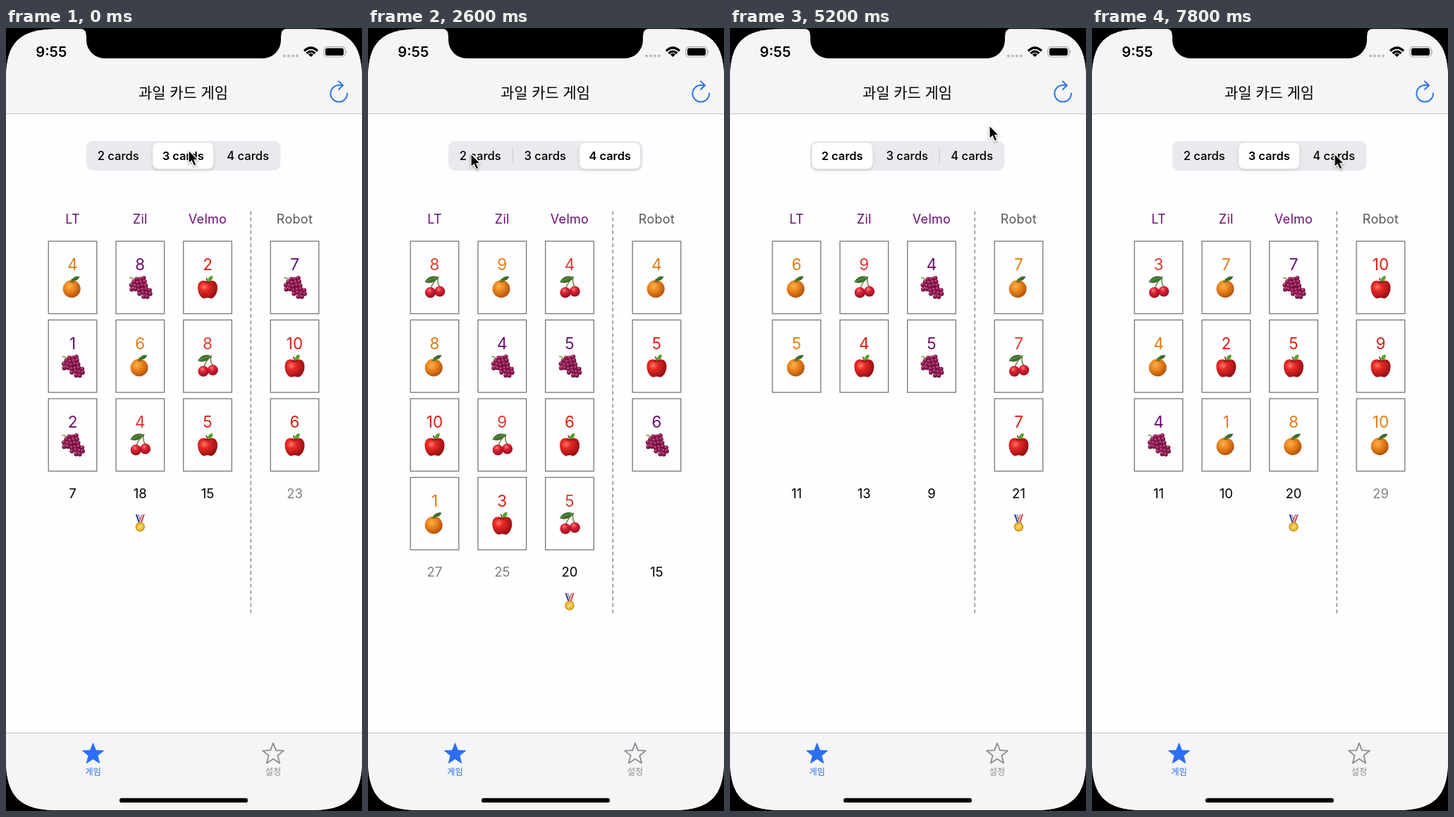
Write an HTML page that moves like this. It is 505 px wide and 1109 px high and loops after 8 s.

```html
<!DOCTYPE html>
<html lang="ko">
<head>
<meta charset="utf-8">
<title>과일 카드 게임</title>
<style>
  html, body { margin: 0; height: 100%; overflow: hidden; background: #000; }
  svg { display: block; width: 100vw; height: 100vh; }
  text { font-family: Inter, "Noto Sans CJK KR", "Noto Sans CJK", sans-serif; text-anchor: middle; }
  .ko { font-family: "Noto Sans CJK KR", "Noto Sans CJK", sans-serif; font-weight: 500; }
  .name { font-size: 18px; letter-spacing: .3px; }
  .num { font-size: 22.5px; }
  .total { font-size: 18.5px; }
  .seg { font-size: 16.6px; font-weight: 500; }
  .seg.on { font-size: 16.4px; font-weight: 600; }
  #thumb { filter: drop-shadow(0 2px 2.5px #0002); }
  #cursor { filter: drop-shadow(0 1px 1.5px #0006); }
</style>
</head>
<body>
<svg viewBox="0 0 505 1109" preserveAspectRatio="none">
  <defs>
    <radialGradient id="appleFill" cx=".33" cy=".35" r=".75">
      <stop offset="0" stop-color="#ff7768"/><stop offset=".3" stop-color="#e62a26"/><stop offset="1" stop-color="#8e0a10"/>
    </radialGradient>
    <radialGradient id="orangeFill" cx=".38" cy=".35" r=".7">
      <stop offset="0" stop-color="#ffb04a"/><stop offset=".45" stop-color="#e8821c"/><stop offset="1" stop-color="#ad4d08"/>
    </radialGradient>
    <radialGradient id="cherryFill" cx=".4" cy=".3" r=".75">
      <stop offset="0" stop-color="#ff7c7a"/><stop offset=".35" stop-color="#da2433"/><stop offset="1" stop-color="#920a1d"/>
    </radialGradient>
    <radialGradient id="grapeFill" cx=".4" cy=".3" r=".75">
      <stop offset="0" stop-color="#cf5f90"/><stop offset=".4" stop-color="#951d55"/><stop offset="1" stop-color="#500a31"/>
    </radialGradient>
    <g id="a">
      <path d="M0-7C4-11 14-10 14 1C14 9 9 16 5 16C3 16 2 15 0 15S-3 16-5 16C-9 16-14 9-14 1C-14-10-4-11 0-7Z" fill="url(#appleFill)"/>
      <path d="M-5-7Q0-4 5-7Q0-9-5-7" fill="#8d131a"/>
      <path d="M0-6Q0-10-2-13" fill="none" stroke="#6b4423" stroke-width="1.7"/>
      <path d="M0-8C0-13 3-16 7-16C8-11 5-8 0-8Z" fill="#58a22c"/>
    </g>
    <g id="o">
      <circle cx="-1.3" cy="2.5" r="12.5" fill="url(#orangeFill)"/>
      <path d="M-1-8L-1-12M-4-8L2-7" stroke="#50702b" stroke-width="1.7"/>
      <path d="M-1-9C0-14 4-16 10-15C8-10 4-8-1-9Z" fill="#3a6f2c"/>
    </g>
    <g id="c">
      <path d="M-6 3Q-2-8 5-14Q3-5 8 0" fill="none" stroke="#61833a" stroke-width="1.5"/>
      <path d="M-14-7C-10-16-1-17 6-14C1-7-6-4-14-7Z" fill="#426f30"/>
      <path d="M-12-8Q-4-13 5-14" fill="none" stroke="#84a862" stroke-width=".7"/>
      <circle cx="7.3" cy="6" r="7.5" fill="url(#cherryFill)"/>
      <circle cx="-6" cy="7.7" r="7.6" fill="url(#cherryFill)"/>
    </g>
    <g id="g"></g>
    <g id="medal">
      <path d="M-6.5-12h4.500L2.500 1H-2Z" fill="#2b3c86"/>
      <path d="M-4.200-12h1.500L1 0H-.5Z" fill="#f1edf2"/>
      <path d="M6.500-12H2L-2.500 1H2Z" fill="#c53241"/>
      <path d="M4.700-12H3.200L-1 0H.5Z" fill="#f1edf2"/>
      <circle cy="5.500" r="6.700" fill="#cf981c"/>
      <circle cy="5.500" r="5" fill="#ecc240"/>
      <path d="M-2.500 7.500L2.500 3.500" stroke="#fff0a6" stroke-width="1.500"/>
    </g>
    <path id="star" stroke-linejoin="round"/>
    <clipPath id="screen">
      <path d="M0 72C0 20 20 1.500 72 1.500H433C485 1.500 505 20 505 72V1037C505 1088 485 1108 433 1108H72C20 1108 0 1088 0 1037Z"/>
    </clipPath>
  </defs>

  <g clip-path="url(#screen)">
    <rect width="505" height="1109" fill="#fefdff"/>
    <path d="M0 0H505V121H0ZM0 998H505V1109H0Z" fill="#f5f4f6"/>
    <path d="M0 121.500H505M0 998.500H505" stroke="#c3c2c5"/>
  </g>
  <path d="M104 0Q114 1 114 12V17A26 26 0 0 0 140 43H364A26 26 0 0 0 390 17V12Q390 1 400 0Z"/>

  <text x="64.300" y="41" font-size="20.200" font-weight="600">9:55</text>
  <g fill="#bdbdc0" id="dots"></g>
  <g fill="none" stroke="#000" stroke-width="3.200">
    <path d="M423 32.500Q432.500 23.500 442 32.500M426.500 36Q432.500 30.500 438.500 36"/>
    <path d="M432.500 41L428.800 37.500Q432.500 34.500 436.200 37.500Z" fill="#000" stroke="none"/>
  </g>
  <rect x="451" y="26.500" width="30" height="14.500" rx="4.500" fill="none" stroke="#a3a3a5" stroke-width="1.200"/>
  <rect x="453" y="28.500" width="26" height="10.500" rx="2.800"/>
  <path d="M482.300 31.500Q484.500 33.700 482.300 36Z" fill="#a3a3a5"/>

  <text class="ko" x="251.500" y="99" font-size="20.900">과일 카드 게임</text>
  <path id="refresh" d="M484 92.500A11.800 11.800 0 1 1 472.300 81H478M472 75.500L478 81.200L472 87" fill="none"
        stroke="#2e76e6" stroke-width="2" stroke-linecap="round" stroke-linejoin="round"/>

  <rect x="114" y="160" width="275.500" height="42" rx="9.500" fill="#eae9ed"/>
  <path id="divider1" d="M205.500 170V192" stroke="#cfced3" stroke-width="1.300"/>
  <path id="divider2" d="M297 170V192" stroke="#cfced3" stroke-width="1.300"/>
  <rect id="thumb" y="162.500" width="86" height="37" rx="8" fill="#fff"/>
  <g id="segments"></g>

  <path d="M347.300 259.500V830" stroke="#85858a" stroke-width="1.400" stroke-dasharray="5.200 3.900"/>
  <g id="table"></g>

  <use href="#star" x="123.500" y="1028.500" fill="#2a6ff3" stroke="#2a6ff3"/>
  <use href="#star" x="379" y="1028.500" fill="none" stroke="#8c8c90" stroke-width="1.800"/>
  <text class="ko" x="123.500" y="1057.500" font-size="12.300" fill="#2a6ff3">게임</text>
  <text class="ko" x="379" y="1057.500" font-size="12.300" fill="#8c8c90">설정</text>
  <rect x="161" y="1090.700" width="182" height="6.400" rx="3.200"/>

  <path id="cursor" d="M0 0V19L4.300 15L7.500 22.300L11 20.800L8 13.800H13.500Z" stroke="#fff" stroke-width="1.300"/>
</svg>
<script>
const LOOP = 8000, STEP = 200, ROW = 111.5;
const columns = [94.5, 190.3, 286, 409.5];
const players = ['LT', 'Zil', 'Velmo', 'Robot'];
const inks = { a: '#dc1f12', o: '#e17d12', c: '#dc3b33', g: '#690f70' };

// Each deal: start time, cards per player, hands of value + fruit.
const deals = [
  [0, 3, '4o1g2g 8g6o4c 2a8c5a 7g10a6a'],
  [1150, 4, '8c8o10a1o 9o4g9c3a 4c5g6a5c 4o5a6g'],
  [2750, 2, '6c2g 5a4o 9o8o 9g4c8g'],
  [4350, 2, '6o5o 9c4a 4g5g 7o7c7a'],
  [5650, 3, '8g1c2a 2o1o4g 7a9g3c 6c5o4a'],
  [6750, 3, '3c4o4g 7o2a1o 7g5a8o 10a9a10o']
];

// Pointer tip: time, x, y.
const pointer = [
  [0, 259, 173], [400, 259, 173], [1000, 355, 174], [1600, 355, 174],
  [2600, 146, 178], [2800, 146, 178], [3400, 433, 107], [3600, 464, 90],
  [3800, 471, 84], [5000, 471, 84], [5200, 368, 138], [5600, 262, 187],
  [6000, 262, 188], [6600, 471, 84], [7400, 472, 87], [7800, 344, 178]
];

const $ = id => document.getElementById(id);
const clamp = v => Math.max(0, Math.min(1, v));
const easeOut = v => 1 - (1 - clamp(v)) ** 3;
const mix = (a, b, p) => a + (b - a) * p;
const sum = cards => cards.reduce((total, [value]) => total + value, 0);
const label = (cls, x, y, fill, value) =>
  `<text class="${cls}" x="${x}" y="${y}" fill="${fill}">${value}</text>`;

function drawStatic() {
  // Berry rows: y, first x, count; a slight wobble keeps the bunch ragged.
  const berryRows = [[-12, -5, 3], [-7, -9, 4], [-2, -12.5, 5], [3.5, -12, 6], [8.5, -1, 4], [13, 5, 2]];
  const berry = (x, y) => `<circle cx="${x}" cy="${y}" r="3.1" fill="url(#grapeFill)"/>`;
  $('g').innerHTML =
    '<path d="M-15-13Q-9-14-8-7Q-14-8-13-1" fill="none" stroke="#80ae45" stroke-width="1.8"/>' +
    '<path d="M-5-11L5-11L13 5L11 12L-10 3Z" fill="#5f0f3b"/>' +
    berryRows.map(([y, x, count]) => Array.from({ length: count }, (_, i) =>
      berry(x + i * 5.1, y + Math.sin(i * 2 + y))).join('')).join('');

  const points = Array.from({ length: 10 }, (_, i) => {
    const r = i % 2 ? 6.7 : 15.7, a = (i / 5 - .5) * Math.PI;
    return `${r * Math.cos(a)} ${r * Math.sin(a)}`;
  });
  $('star').setAttribute('d', `M${points.join('L')}Z`);
  $('dots').innerHTML = [0, 1, 2, 3].map(i => `<circle cx="${395 + i * 6}" cy="39.5" r="2.1"/>`).join('');
}

function handMarkup(cards, i, rows, best) {
  const x = columns[i], total = sum(cards), shift = (rows - 3) * ROW;
  let out = label('name', x, 277, i === 3 ? '#59575c' : '#690f70', players[i]);
  cards.forEach(([value, fruit], r) => {
    const y = 302 + r * ROW;
    out += `<rect x="${x - 34.3}" y="${y}" width="68.6" height="102.6" fill="none" stroke="#77777b" stroke-width="1.3"/>` +
      label('num', x, y + 41, inks[fruit], value) + `<use href="#${fruit}" x="${x}" y="${y + 65}"/>`;
  });
  out += label('total', x, 665.5 + shift, total > 21 ? '#808084' : '#000', total);
  if (total === best) out += `<use href="#medal" x="${x}" y="${701 + shift}"/>`;
  return out;
}

function drawTable([, count, text]) {
  const hands = text.split(' ').map(hand =>
    [...hand.matchAll(/(\d+)(\w)/g)].map(([, value, fruit]) => [+value, fruit])
  );
  const best = Math.max(...hands.map(sum).filter(total => total <= 21));
  const rows = Math.max(3, count);
  $('table').innerHTML = hands.map((cards, i) => handMarkup(cards, i, rows, best)).join('');
  $('segments').innerHTML = [2, 3, 4].map(n =>
    label(n === count ? 'seg on' : 'seg', 159.2 + (n - 2) * 92, 187, '#000', `${n} cards`)).join('');
}

function drawControls(t, index) {
  const [start, count] = deals[index];
  const before = index ? deals[index - 1][1] : count;
  const p = easeOut((t - start) / 400);
  $('thumb').setAttribute('x', 116.3 + 92 * (mix(before, count, p) - 2));
  const dividerAlpha = n => mix(+(before === n), +(count === n), p);
  $('divider1').setAttribute('opacity', dividerAlpha(4));
  $('divider2').setAttribute('opacity', dividerAlpha(2));
  const refreshed = index > 0 && before === count;
  $('refresh').setAttribute('opacity', refreshed ? mix(.3, 1, clamp((t - start) / 350)) : 1);
}

function drawPointer(t) {
  const next = pointer.findIndex(key => key[0] > t);
  const b = pointer.at(next);
  const a = next < 0 ? b : pointer[next - 1];
  const p = clamp((t - a[0]) / (b[0] - a[0] || 1));
  const s = p * p * (3 - 2 * p);
  $('cursor').setAttribute('transform', `translate(${mix(a[1], b[1], s)} ${mix(a[2], b[2], s)})`);
}

let shownTime = -1, shownDeal = -1;
function tick(now) {
  const t = Math.floor(now % LOOP / STEP) * STEP;
  if (t !== shownTime) {
    const index = deals.findLastIndex(deal => deal[0] <= t);
    if (index !== shownDeal) drawTable(deals[index]);
    drawControls(t, index);
    drawPointer(t);
    shownTime = t;
    shownDeal = index;
  }
  requestAnimationFrame(tick);
}

drawStatic();
tick(0);
</script>
</body>
</html>
```
